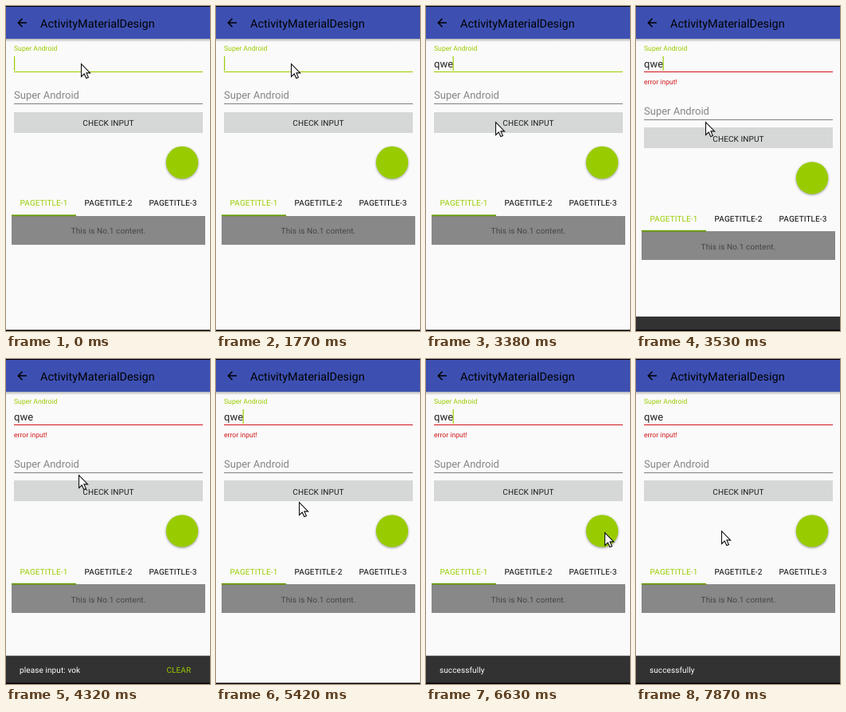
Write an HTML page that moves like this. It is 256 by 407 pixels and loops after 8 s.

```html
<!DOCTYPE html>
<html lang="en">
<head>
<meta charset="utf-8">
<title>Material form</title>
<style>
  html, body { margin: 0; overflow: hidden; }
  svg { display: block; width: 256px; height: 407px; background: #fafafa;
    font: 10px Roboto, sans-serif; text-rendering: geometricPrecision; }
  text { letter-spacing: .1px; }
  .title, .field, .small { letter-spacing: 0; }
  .title { font-size: 14.4px; }
  .field { font-size: 13px; }
  .small { font-size: 8.65px; }
  .mid { text-anchor: middle; }
  .green { fill: #9c0; }
  .crisp { shape-rendering: crispEdges; }
  #fab { filter: drop-shadow(0 1.5px 1.8px #0006); }
</style>
</head>
<body>
<svg viewBox="0 0 256 407">
  <linearGradient id="shade" x2="0" y2="1">
    <stop stop-opacity=".28"/>
    <stop offset="1" stop-opacity="0"/>
  </linearGradient>
  <rect width="256" height="41" fill="#3d50b2"/>
  <rect y="41" width="256" height="4" fill="url(#shade)"/>
  <rect width="256" height="1"/>
  <path d="M26 21H15.5M20.5 15.8L15.3 21L20.5 26.2" fill="none" stroke="#000" stroke-width="1.6"/>
  <text class="title" x="43" y="27">ActivityMaterialDesign</text>

  <text class="small green" x="10" y="56">Super Android</text>
  <text id="typed" class="field" x="10" y="77" fill="#222"></text>
  <rect id="caret" class="green" y="63" width="1.2" height="18"/>
  <rect id="line" class="crisp" x="10" y="82" width="237" height="1"/>
  <text id="error" class="small" x="10" y="98" fill="#d0161b">error input!</text>

  <g id="below">
    <text class="field" x="10" y="116.2" fill="#858585">Super Android</text>
    <rect class="crisp" x="10" y="122.4" width="237" height="1" fill="#808080"/>
    <rect class="crisp" x="10" y="133" width="237" height="26" fill="#d6d7d7"/>
    <text class="mid" x="128.5" y="150.2" fill="#1c1c1c">CHECK INPUT</text>
    <circle id="fab" class="green" cx="221" cy="196" r="20.2"/>
    <text class="mid green" x="47.5" y="250.2">PAGETITLE-1</text>
    <text class="mid" x="128.5" y="250.2">PAGETITLE-2</text>
    <text class="mid" x="209.5" y="250.2">PAGETITLE-3</text>
    <rect class="crisp" x="7" y="263" width="243" height="36" fill="#888"/>
    <rect x="7" y="261.4" width="81" height="1.8" fill="#690"/>
    <text class="mid" x="128.5" y="285.2" fill="#444">This is No.1 content.</text>
  </g>

  <g id="snackbar">
    <rect y="371.6" width="256" height="36" fill="#323232"/>
    <g id="notice">
      <text id="message" x="17" y="393" fill="#fff"></text>
      <text id="action" class="green" x="201.4" y="393">CLEAR</text>
    </g>
  </g>
  <rect y="405.5" width="256" height="1.5"/>
  <path id="mouse" d="M.5 .5V16.5L4.2 13L6.8 18.6L9.4 17.4L6.9 11.9H11.6Z" fill="#fff" stroke="#111" stroke-width="1.1"/>
</svg>
<script>
const LOOP = 8000, STEPS = 59, STEP = LOOP / STEPS, LEAD = 20;
const BLINK = 500, FAIL = 3435, SUCCESS = 6330;
const WORD = 'qwe', FOCUS = -240, KEY_TIMES = [1990, 2150, 2355];

const START = { x: 94, y: 72 };
const MOVES = [
  { from: 2580, to: 2980, x: 87, y: 145 },
  { from: 4200, to: 4320, x: 91, y: 145 },
  { from: 5020, to: 5420, x: 104, y: 179 },
  { from: 5420, to: 6080, x: 224, y: 217 },
  { from: 6650, to: 7320, x: 107, y: 215 },
];

const $ = id => document.getElementById(id);
const ramp = (t, start, length) => Math.min(1, Math.max(0, (t - start) / length));
const easeOut = p => 1 - (1 - p) ** 2;
const smooth = p => p * p * (3 - 2 * p);
const shift = (id, x, y) => $(id).setAttribute('transform', `translate(${x} ${y})`);

function drawInput(t, failed) {
  const pressed = KEY_TIMES.filter(time => time <= t);
  $('typed').textContent = WORD.slice(0, pressed.length);
  const end = $('typed').getComputedTextLength();
  $('caret').setAttribute('x', Math.max(10, 9.5 + end));
  // Every key press restarts the blinking
  const idle = t - (pressed.at(-1) ?? FOCUS);
  $('caret').style.opacity = Math.floor(idle / BLINK) % 2 ? 0 : 1;

  $('line').setAttribute('fill', failed ? '#d0161b' : '#9c0');
  $('error').style.opacity = failed ? 1 : 0;
  shift('below', 0, failed ? 19.4 : 0);
}

function drawSnackbar(t) {
  const success = t >= SUCCESS;
  const start = success ? SUCCESS : FAIL;
  const shown = easeOut(ramp(t, start, 300)) - smooth(ramp(t, start + 1585, 400));
  $('message').textContent = success ? 'successfully' : 'please input: vok';
  $('action').style.opacity = success ? 0 : 1;
  $('notice').style.opacity = ramp(t, start + 90, 180);
  shift('snackbar', 0, 35.4 * (1 - shown));
}

function drawMouse(t) {
  let { x, y } = START;
  for (const move of MOVES) {
    const p = smooth(ramp(t, move.from, move.to - move.from));
    x += (move.x - x) * p;
    y += (move.y - y) * p;
  }
  shift('mouse', Math.round(x), Math.round(y));
}

function frame() {
  // The screen refreshes in even steps
  const step = Math.floor((performance.now() % LOOP + LEAD) / STEP);
  const t = Math.min(step, STEPS - 1) * STEP;
  drawInput(t, t >= FAIL);
  drawSnackbar(t);
  drawMouse(t);
  requestAnimationFrame(frame);
}
frame();
</script>
</body>
</html>
```
